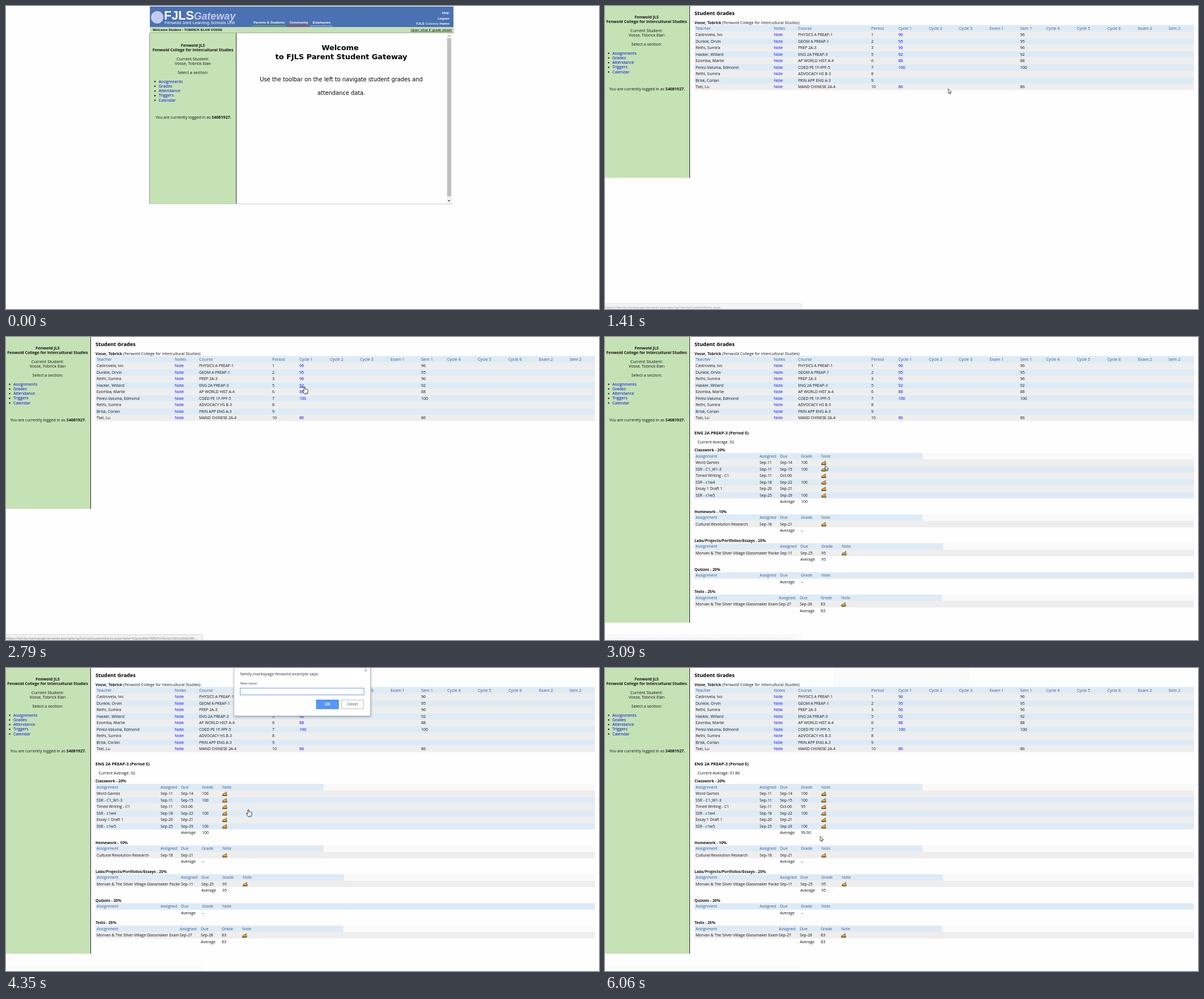
Recreate the animation shown at these times as an HTML page with a canvas. Size 1047 px wide and 535 px high, loop 6.09 s.

```html
<!DOCTYPE html>
<html lang="en">
<head>
<meta charset="utf-8">
<title>Grade portal</title>
<style>
html, body { margin: 0; width: 100%; height: 100%; overflow: hidden; background: #fefefe; }
canvas { display: block; width: 1047px; height: 535px; }
</style>
</head>
<body>
<canvas id="stage"></canvas>
<script>
const W = 1047, H = 535, LOOP = 6090, STEP = 30;
const canvas = document.getElementById('stage');
const ctx = canvas.getContext('2d');
const dpr = window.devicePixelRatio || 1;
canvas.width = W * dpr;
canvas.height = H * dpr;

const PAGE = '#fefefe', GREEN = '#c5e2b5', LINK = '#0000ee', INK = '#111', HEAD = '#2b5a9b';
const BLUE_ROW = '#deebf5', GRAY_ROW = '#eeeeee', LAVENDER = '#c3cbf5';
const SCHOOL = 'Fenwold College for Intercultural Studies';
const HOST = 'family.markspage.fenwold.example';
const URL_LIST = 'https://' + HOST + '/vg/FamilyStudentMarks.aspx';
const URL_CLASS = URL_LIST + '?data=KZpqLWdsTR8vHnYeUcJmXbGoDiQsWk...';

// When each scene event happens, in ms
const T = { list: 1410, detail: 2850, open: 3900, nine: 4560, five: 4710, close: 4800 };

const TEACHERS = [
  ['Castrovela, Ivo', 'PHYSICS A PREAP-1', 1, 96],
  ['Dunkle, Orvin', 'GEOM A PREAP-1', 2, 95],
  ['Rethi, Sumira', 'PREP 2A-3', 3, 96],
  ['Hasker, Willard', 'ENG 2A PREAP-3', 5, 92],
  ['Ezomba, Marlie', 'AP WORLD HIST A-4', 6, 88],
  ['Perez-Valuma, Edmond', 'COED PE 1F-FPF-5', 7, 100],
  ['Rethi, Sumira', 'ADVOCACY HS B-3', 8, ''],
  ['Brisk, Corlan', 'PRIN APP ENG A-3', 9, ''],
  ['Tsei, Lu', 'MAND CHINESE 2A-4', 10, 86]
];
const COLUMNS = [
  ['Teacher', 160], ['Notes', 298], ['Course', 341], ['Period', 470],
  ['Cycle 1', 518], ['Cycle 2', 572], ['Cycle 3', 625], ['Exam 1', 679], ['Sem 1', 733],
  ['Cycle 4', 779], ['Cycle 5', 833], ['Cycle 6', 887], ['Exam 2', 941], ['Sem 2', 995]
];
const NARROW = [160, 273, 309, 346, 382];
const BOOK = 'Morvan & The Silver Village Glassmaker';

// Pointer path: time, x, y of the tip
const PATH = [
  [60, 1024, 47], [180, 905, 107], [270, 826, 112], [360, 763, 104], [450, 754, 70], [510, 753, 50],
  [660, 753, 50], [720, 720, 43], [870, 480, 96], [1020, 283, 138], [1200, 283, 138],
  [1320, 604, 130], [1410, 606, 146], [1500, 578, 149], [1680, 548, 120], [1890, 528, 101],
  [1980, 524, 96], [2040, 522, 91], [2160, 527, 88], [2880, 527, 88], [2940, 505, 161],
  [3000, 478, 183], [3090, 389, 227], [3270, 404, 258], [3450, 398, 250], [3630, 384, 243],
  [3720, 389, 245], [3900, 389, 245], [4020, 428, 250], [5400, 428, 250], [5580, 388, 338],
  [5730, 358, 318], [5880, 354, 296], [6000, 367, 288], [6060, 380, 297]
];
const HAND_TIMES = [[1020, 1200], [2070, 2880], [3660, 4800]];

const sans = (size, weight = 400) => `${weight} ${size}px "Open Sans", sans-serif`;
const arial = (size, style = '400') => `${style} ${size}px "Liberation Sans", Arial, sans-serif`;
const dejavu = (size, weight = 400) => `${weight} ${size}px "DejaVu Sans", Verdana, sans-serif`;
const clamp = v => Math.max(0, Math.min(1, v));
const ramp = (t, from, to) => clamp((t - from) / (to - from));
const within = (t, [from, to]) => t >= from && t < to;

function rect(x, y, w, h, color) {
  ctx.fillStyle = color;
  ctx.fillRect(x, y, w, h);
}

// Draws text centred vertically on y and returns its width
function text(s, x, y, font = sans(7), color = INK, align = 'left') {
  ctx.font = font;
  ctx.fillStyle = color;
  ctx.textAlign = align;
  ctx.fillText(s, x, y + parseFloat(font.match(/([\d.]+)px/)[1]) * 0.36);
  return ctx.measureText(s).width;
}

function link(s, x, y, hover, font) {
  const w = text(s, x, y, font, LINK);
  if (hover) rect(x, y + 3.2, w, 0.8, LINK);
}

function shape(points, fill, stroke, width = 0.8) {
  ctx.beginPath();
  points.forEach(([x, y]) => ctx.lineTo(x, y));
  ctx.closePath();
  if (fill) { ctx.fillStyle = fill; ctx.fill(); }
  if (stroke) { ctx.strokeStyle = stroke; ctx.lineWidth = width; ctx.lineJoin = 'round'; ctx.stroke(); }
}

function at(x, y, draw) {
  ctx.save();
  ctx.translate(x, y);
  draw();
  ctx.restore();
}

function sidebarText(hoverGrades) {
  const mid = 73.5;
  text('Fenwold JLS', mid, 19.5, sans(7.2, 700), INK, 'center');
  text(SCHOOL, mid, 27.5, sans(7, 700), INK, 'center');
  text('Current Student:', mid, 43, sans(7.4), INK, 'center');
  text('Vosse, Tobrick Elan', mid, 51, sans(7.2), INK, 'center');
  text('Select a section:', mid, 67.5, sans(7.3), INK, 'center');
  ['Assignments', 'Grades', 'Attendance', 'Triggers', 'Calendar'].forEach((s, i) => {
    const y = 83 + i * 8.25;
    ctx.beginPath();
    ctx.arc(6.5, y + 0.5, 1.2, 0, 7);
    ctx.fillStyle = INK;
    ctx.fill();
    link(s, 13, y, hoverGrades && i === 1, sans(7.2));
  });
  const w = text('You are currently logged in as ', 7.5, 146.5, sans(7.1));
  text('S4081927.', 7.5 + w, 146.5, sans(7.1, 700));
}

function tab(x1, x2, color) {
  ctx.beginPath();
  ctx.moveTo(x1, 37);
  ctx.quadraticCurveTo(x1 + 1, 34.8, x1 + 4, 34.8);
  ctx.lineTo(x2 - 4, 34.8);
  ctx.quadraticCurveTo(x2 - 1, 34.8, x2, 37);
  ctx.strokeStyle = color;
  ctx.lineWidth = 1.8;
  ctx.stroke();
}

function welcomePage(t) {
  rect(254, 1, 536, 36.5, '#4a71b1');
  ctx.beginPath();
  ctx.arc(267, 20, 11, 0, 7);
  ctx.fillStyle = LAVENDER;
  ctx.fill();
  text('FJLS', 279, 15.8, arial(21.6, '700'), '#fff');
  text('Gateway', 331.5, 17.2, arial(17.9, 'italic 700'), LAVENDER);
  text('Fenwold Joint Learning Schools Unit', 280, 29.2, arial(7.65), '#fff');

  const bold = arial(6, '700');
  text('Parents & Students', 437, 29.3, bold, '#fff');
  text('Community', 500.5, 29.3, bold, '#fff');
  text('Employees', 541.5, 29.3, bold, '#fff');
  tab(435, 494, '#62a845');
  tab(497, 535, '#c93a3a');
  tab(537, 576, '#7f9fd0');
  text('Help', 782.5, 12, bold, '#fff', 'right');
  text('Logout', 782.5, 21.7, bold, '#fff', 'right');
  const home = text(' Home', 782.5, 31.3, bold, '#fff', 'right');
  const gate = text('Gateway', 782.5 - home, 31.3, arial(6, 'italic 400'), '#fff', 'right');
  text('FJLS ', 782.5 - home - gate, 31.3, bold, '#fff', 'right');

  rect(254, 37.5, 537, 10, GREEN);
  rect(254, 47, 537, 1, '#9fb592');
  text('Welcome Student - TOBRICK ELAN VOSSE', 259, 42, bold);
  const viewer = text("Open 'what if' grade viewer", 787.5, 42, arial(6.1), INK, 'right');
  rect(787.5 - viewer, 44.8, viewer, 0.7, INK);

  rect(254, 48, 152, 301, GREEN);
  rect(253, 48, 1, 301, '#999');
  rect(406, 48, 1, 301, '#333');
  rect(253, 349, 535, 1, '#ccc');
  at(256.5, 50, () => sidebarText(within(t, HAND_TIMES[0])));

  text('Welcome', 590, 73, dejavu(12.9, 700), '#000', 'center');
  text('to FJLS Parent Student Gateway', 592, 89, dejavu(12.9, 700), '#000', 'center');
  text('Use the toolbar on the left to navigate student grades and', 592, 129, dejavu(9.84), '#000', 'center');
  text('attendance data.', 592, 153.3, dejavu(9.84), '#000', 'center');

  rect(778, 48, 9, 301, '#f1f1f1');
  rect(779, 57, 7, 279, '#bfbfbf');
  shape([[780, 54], [784.5, 54], [782.2, 51.5]], '#aaa');
  shape([[780, 343], [784.5, 343], [782.2, 345.6]], '#444');
}

function gradesTable(hover) {
  text('Student Grades', 158, 13, sans(9.2, 700), '#000');
  const w = text('Vosse, Tobrick', 158, 29.5, sans(6.7, 700));
  text(`(${SCHOOL})`, 160 + w, 29.5);
  rect(158, 33.5, 882, 11.5, BLUE_ROW);
  COLUMNS.forEach(([s, x]) => text(s, x, 39.3, sans(7.3), HEAD));
  TEACHERS.forEach(([name, course, period, grade], i) => {
    const y = 50.8 + i * 11.5;
    rect(158, y - 5.8, 882, 11.5, i % 2 ? BLUE_ROW : GRAY_ROW);
    text(name, 160, y);
    link('Note', 298, y, false, sans(7));
    text(course, 341, y, sans(6.8));
    text(period, 470, y);
    link(grade, 518, y, grade !== '' && grade === hover, sans(7));
    text(grade, 733, y);
  });
}

function noteIcon(x, y) {
  at(x, y, () => {
    shape([[-4, 2.6], [-3, 0], [0, -1], [2.4, -3.2], [3.6, -2.4], [1.8, 0], [4, 0.8], [3.6, 2.8]], '#f6a51f', '#4a3510', 0.7);
    rect(-4, 2.7, 8, 1, '#3a2c14');
    rect(-1.5, 0.6, 3, 0.8, '#ffd978');
  });
}

function section(title, y, cols, end, rows, average) {
  text(title, 158, y, sans(6.8, 700));
  let line = y + 10.3;
  rect(158, line - 5.6, 882, 11.5, '#f9f9f9');
  rect(158, line - 5.6, end - 158, 11.5, BLUE_ROW);
  ['Assignment', 'Assigned', 'Due', 'Grade', 'Note'].forEach((s, i) => text(s, cols[i], line, sans(7), HEAD));
  rows.forEach((row, i) => {
    line += 11.5;
    rect(158, line - 5.7, 882, 11.5, i % 2 ? BLUE_ROW : GRAY_ROW);
    row.forEach((s, c) => text(s, cols[c], line, sans(c ? 6.8 : 6.9)));
    noteIcon(cols[4] + 4.2, line + 0.3);
  });
  line += 11.5;
  text('Average', cols[2], line, sans(6.9));
  text(average, cols[3], line, sans(6.9));
}

function details(saved) {
  text('ENG 2A PREAP-3 (Period 5)', 158, 169, sans(7.4, 700));
  text('Current Average: ' + (saved ? '91.86' : '92'), 163.5, 185);
  section('Classwork - 20%', 200, NARROW, 560.5, [
    ['Word Games', 'Sep-11', 'Sep-14', '100'],
    ['SSR - C1_W1-3', 'Sep-11', 'Sep-15', '100'],
    ['Timed Writing - C1', 'Sep-11', 'Oct-06', saved ? '95' : ''],
    ['SSR - c1w4', 'Sep-18', 'Sep-22', '100'],
    ['Essay 1 Draft 1', 'Sep-20', 'Sep-21', ''],
    ['SSR - c1w5', 'Sep-25', 'Sep-29', '100']
  ], saved ? '99.00' : '100');
  section('Homework - 10%', 308.5, NARROW, 560.5,
    [['Cultural Revolution Research', 'Sep-18', 'Sep-21', '']], '--');
  section('Labs/Projects/Portfolios/Essays - 25%', 359.5, [160, 309, 345, 382, 418], 597,
    [[BOOK + ' Packe', 'Sep-11', 'Sep-25', '95']], '95');
  section('Quizzes - 20%', 410.5, NARROW, 1040, [], '--');
  section('Tests - 25%', 450, [160, 307, 344, 381, 417], 595,
    [[BOOK + ' Exam', 'Sep-27', 'Sep-28', '83']], '83');
}

function gradesPage(t) {
  const open = t >= T.detail;
  const height = open ? 504.5 : 303.5;
  rect(0, 0, 149, height, GREEN);
  rect(149, 0, 1, height, '#222');
  sidebarText(false);
  const hover = within(t, [1980, 2100]) ? 88 : within(t, [2100, T.detail]) ? 92 : null;
  gradesTable(hover);
  if (open) details(t >= T.close);
}

function dialog(t) {
  const alpha = Math.min(ramp(t, T.open - 30, T.open + 90), 1 - ramp(t, T.close - 30, T.close + 150));
  if (t >= T.close) rect(403, 0, 240, 33, 'rgba(0,0,0,0.015)');
  if (alpha <= 0) return;
  ctx.save();
  ctx.globalAlpha = alpha;
  ctx.shadowColor = 'rgba(0,0,0,0.35)';
  ctx.shadowBlur = 4 * dpr;
  ctx.shadowOffsetY = dpr;
  rect(402.5, -4, 241, 88.5, '#fff');
  ctx.shadowColor = 'transparent';
  ctx.strokeStyle = '#b5b5b5';
  ctx.lineWidth = 0.8;
  ctx.strokeRect(402.5, -4, 241, 88.5);

  text(HOST + ' says:', 413.5, 10.5, sans(7.3), '#333');
  text('New value', 413.5, 27, sans(6.1), '#333');
  ctx.strokeStyle = '#666';
  ctx.beginPath();
  ctx.moveTo(633.5, 2.5); ctx.lineTo(637, 6);
  ctx.moveTo(637, 2.5); ctx.lineTo(633.5, 6);
  ctx.stroke();

  ctx.strokeStyle = '#6a9fe6';
  ctx.lineWidth = 1;
  ctx.strokeRect(413.5, 35.5, 218.5, 12);
  if (t >= T.nine) text(t >= T.five ? '95' : '9', 416, 41.5, sans(6.3), '#222');
  else if (within(t, [3990, 4350])) rect(416, 36.5, 0.8, 9.5, '#222');

  rect(548, 56.5, 39, 15.5, '#5596fb');
  ctx.strokeStyle = '#3f7fe0';
  ctx.strokeRect(548, 56.5, 39, 15.5);
  text('OK', 567.5, 64, sans(6.4, 700), '#fff', 'center');
  ctx.strokeStyle = '#bbb';
  ctx.strokeRect(592.5, 56.5, 38.5, 15.5);
  text('Cancel', 611.5, 64, sans(6.2), '#444', 'center');
  ctx.restore();
}

function statusBar(t) {
  if (t > T.list) rect(0, 525.5, 347, 9.5, '#fafafa');
  const first = t < 2000;
  const alpha = first
    ? Math.min(ramp(t, 1020, 1110), 1 - ramp(t, 1380, 1500))
    : Math.min(ramp(t, 2370, 2490), 1 - ramp(t, 2970, 3105));
  if (alpha <= 0) return;
  ctx.save();
  ctx.globalAlpha = alpha;
  ctx.beginPath();
  ctx.roundRect(-2, 525.5, 349, 14, [0, 2, 0, 0]);
  ctx.fillStyle = '#f2f2f2';
  ctx.fill();
  ctx.strokeStyle = '#cfcfcf';
  ctx.lineWidth = 0.8;
  ctx.stroke();
  text(first ? URL_LIST : URL_CLASS, 0, 531.6, sans(6.07), '#777');
  ctx.restore();
}

function arrow() {
  shape([[0, 0], [0, 8.4], [1.9, 6.7], [3.2, 9.6], [4.5, 9], [3.2, 6.2], [5.8, 6]], '#fff', '#222');
}

function hand() {
  shape([[-1, 0.6], [0, 0], [1, 0.6], [1, 4], [2.8, 4], [4.6, 4.6], [6, 5.4], [6, 9], [5, 12.4],
    [-0.4, 12.4], [-2.2, 9.6], [-3.6, 7], [-2.8, 6.2], [-1, 7.6]], '#fff', '#222', 0.9);
  rect(1.6, 9, 0.6, 2, '#555');
  rect(3.4, 9, 0.6, 2, '#555');
}

function pointer(t) {
  if (t < PATH[0][0]) return;
  let i = PATH.findIndex(p => p[0] > t);
  if (i < 0) i = PATH.length - 1;
  const [t0, x0, y0] = PATH[i - 1], [t1, x1, y1] = PATH[i];
  const k = ramp(t, t0, t1);
  const x = Math.round(x0 + (x1 - x0) * k), y = Math.round(y0 + (y1 - y0) * k);
  at(x, y, HAND_TIMES.some(span => within(t, span)) ? hand : arrow);
}

const start = performance.now();
function frame() {
  const t = Math.floor(((performance.now() - start) % LOOP) / STEP) * STEP;
  ctx.setTransform(dpr, 0, 0, dpr, 0, 0);
  rect(0, 0, W, H, PAGE);
  if (t < T.list) welcomePage(t);
  else gradesPage(t);
  dialog(t);
  statusBar(t);
  pointer(t);
  requestAnimationFrame(frame);
}
frame();
</script>
</body>
</html>
```
